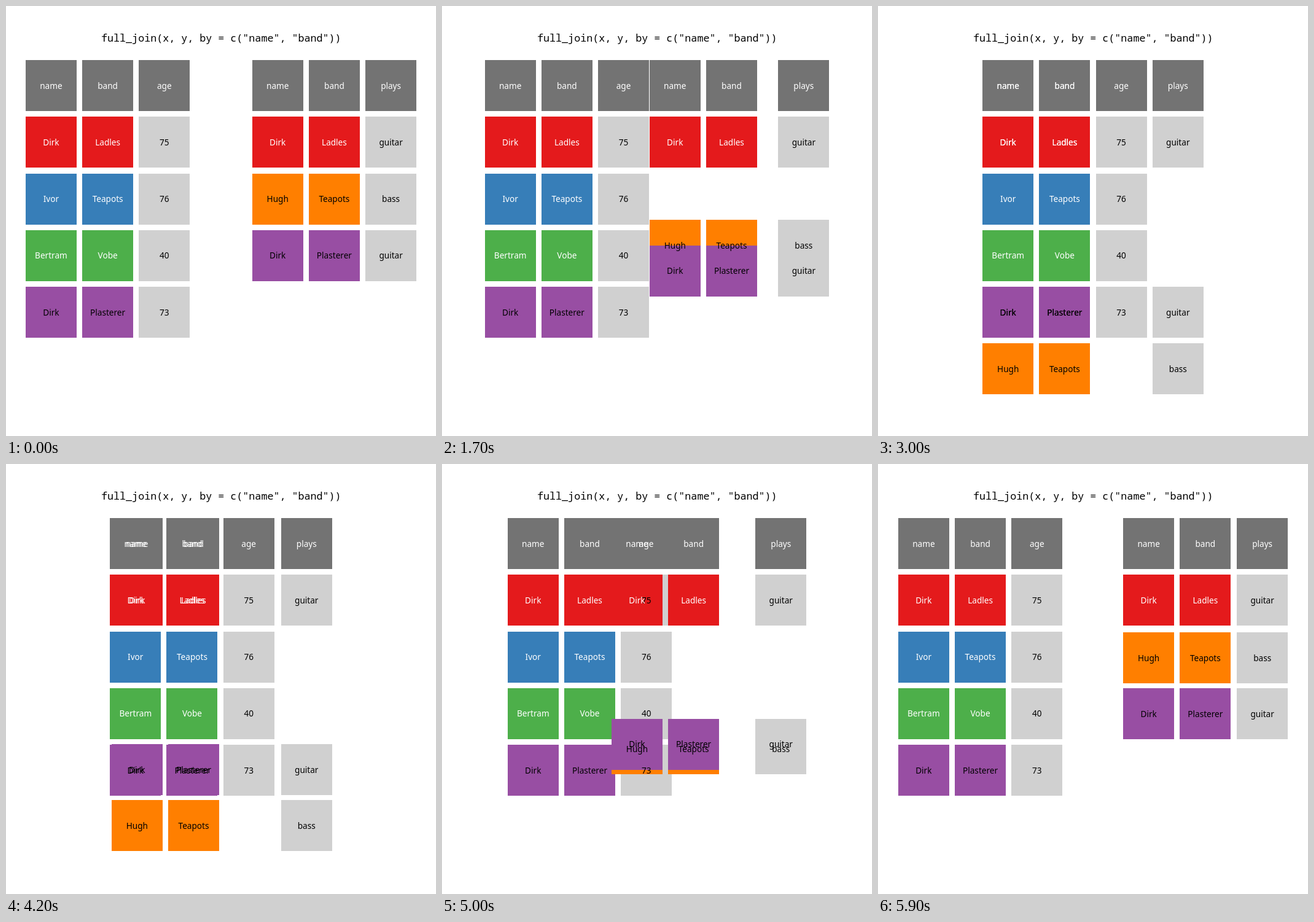
These frames come from a looping animation (700 by 700 pixels, 6000 ms). An HTML page with a canvas:

```html
<!DOCTYPE html>
<html lang="en">
<head>
<meta charset="utf-8">
<title>full_join</title>
<style>
  html, body { margin: 0; width: 100%; height: 100%; overflow: hidden; background: #fff; }
  canvas { display: block; width: 100%; height: 100%; }
</style>
</head>
<body>
<canvas id="stage" width="700" height="700"></canvas>
<script>
const ctx = document.getElementById("stage").getContext("2d");

const LOOP = 6000, STEP = 100;
const UNIT = 92.2, TILE = 83, CENTER = 350, FIRST_ROW = 129.7;
const HEADER = "#737373", PLAIN = "#d0d0d0";
const RED = "#e41a1c", BLUE = "#377eb8", GREEN = "#4daf4a", PURPLE = "#984ea3", ORANGE = "#ff7f00";
const LIGHT_TEXT = new Set([HEADER, RED, BLUE, GREEN]);

// Row: key color, three labels, start row, joined row
const leftTable = [
  [HEADER, ["name", "band", "age"], 0, 0],
  [RED, ["Dirk", "Ladles", "75"], 1, 1],
  [BLUE, ["Ivor", "Teapots", "76"], 2, 2],
  [GREEN, ["Bertram", "Vobe", "40"], 3, 3],
  [PURPLE, ["Dirk", "Plasterer", "73"], 4, 4],
];
const rightTable = [
  [HEADER, ["name", "band", "plays"], 0, 0],
  [RED, ["Dirk", "Ladles", "guitar"], 1, 1],
  [ORANGE, ["Hugh", "Teapots", "bass"], 2, 5],
  [PURPLE, ["Dirk", "Plasterer", "guitar"], 3, 4],
];

// Columns are measured in units from the middle of the stage.
function makeCells(table, startCols, joinedCols) {
  return table.flatMap(([key, labels, startRow, joinedRow]) =>
    labels.map((label, i) => ({
      label,
      fill: i < 2 || key === HEADER ? key : PLAIN,
      from: [startCols[i], startRow],
      to: [joinedCols[i], joinedRow],
    })));
}

const cells = [
  ...makeCells(leftTable, [-3, -2, -1], [-1.5, -0.5, 0.5]),
  ...makeCells(rightTable, [1, 2, 3], [-1.5, -0.5, 1.5]),
];

const easeSine = p => (1 - Math.cos(Math.PI * p)) / 2;
const clamp = p => Math.min(1, Math.max(0, p));
const mix = (a, b, p) => a + (b - a) * p;

function joinProgress(time) {
  const tick = Math.floor((time % LOOP) / STEP);
  return tick < 42
    ? easeSine(clamp((tick - 10) / 20))
    : 1 - easeSine(clamp((tick - 41) / 19));
}

function draw(time) {
  const p = joinProgress(time);
  const placed = cells.map(({ label, fill, from, to }) => ({
    label,
    fill,
    x: CENTER + UNIT * mix(from[0], to[0], p),
    y: FIRST_ROW + UNIT * mix(from[1], to[1], p),
  }));

  ctx.fillStyle = "#fff";
  ctx.fillRect(0, 0, 700, 700);
  ctx.textAlign = "center";

  for (const { fill, x, y } of placed) {
    ctx.fillStyle = fill;
    ctx.fillRect(Math.round(x - TILE / 2), Math.round(y - TILE / 2), TILE, TILE);
  }

  // All labels lie above all tiles.
  ctx.font = '13.6px "Fira Sans", "Noto Sans", sans-serif';
  for (const { label, fill, x, y } of placed) {
    ctx.fillStyle = LIGHT_TEXT.has(fill) ? "#fff" : "#000";
    ctx.fillText(label, x, Math.round(y + 5));
  }

  ctx.fillStyle = "#000";
  ctx.font = '16.7px "Fira Mono", "Noto Sans Mono", monospace';
  ctx.fillText('full_join(x, y, by = c("name", "band"))', CENTER + 0.3, 58);
}

const start = performance.now();
function frame() {
  draw(performance.now() - start);
  requestAnimationFrame(frame);
}
frame();
</script>
</body>
</html>
```
